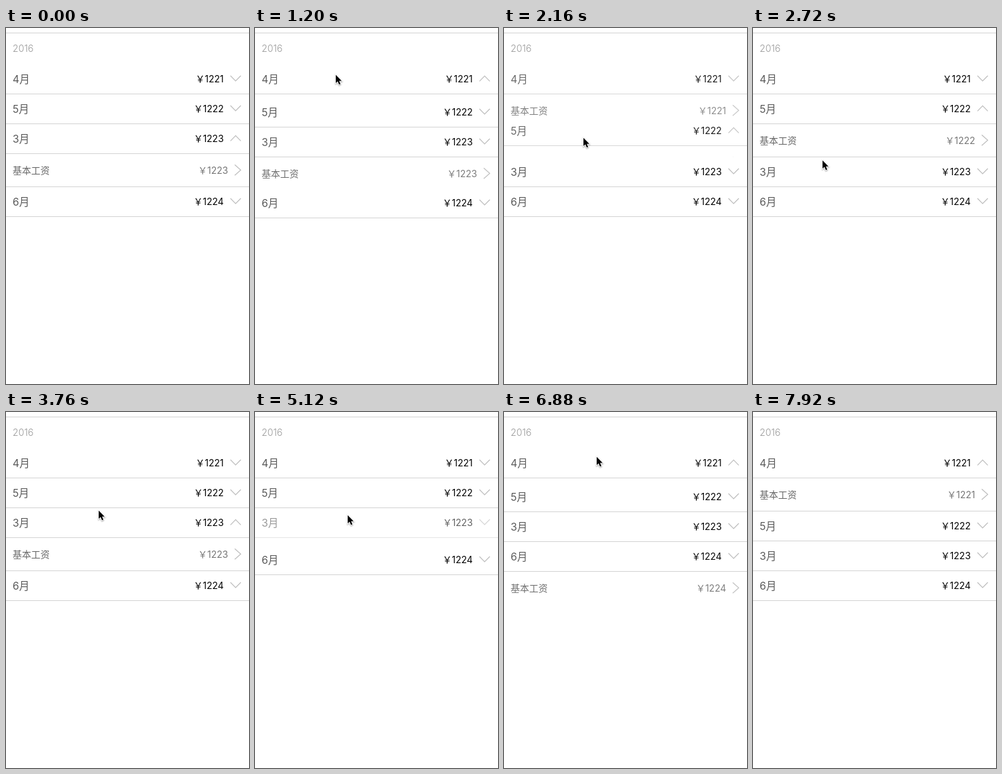
An HTML page with a canvas that plays this animation: 367x537 px, repeating every 8.64 s.

```html
<!DOCTYPE html>
<html lang="zh">
<head>
<meta charset="utf-8">
<title>工资</title>
<style>
  html, body { margin: 0; width: 100%; height: 100%; overflow: hidden; background: #fff; }
  canvas { display: block; width: 367px; height: 537px; }
</style>
</head>
<body>
<canvas id="stage"></canvas>
<script>
const W = 367, H = 537, LOOP = 8640, STEP = 80;
const ROW = 45, DETAIL = 50, TOP = 55, SPEED = 400, LAG = 20;
const FONT = 'Inter, "Noto Sans CJK SC", "Noto Sans CJK", sans-serif';
const rows = [4, 5, 3, 6].map((n, i) => ({ month: n + '月', amount: '￥' + (1221 + i) }));

// time and row of each tap; a tap on the open row closes it
const taps = [[1115, 0], [1995, 1], [2875, 2], [4850, 2], [5755, 3], [6786, 0]];

// cursor strokes: start, duration, end x, end y
const strokes = [
  [160, 80, 128, 162], [320, 480, 120, 70], [1350, 480, 118, 165], [2320, 400, 103, 199],
  [3440, 320, 138, 148], [3800, 200, 137, 190], [4400, 240, 138, 155], [5200, 400, 138, 205],
  [6160, 480, 138, 67], [7040, 400, 135, 518], [7600, 240, 112, 528]
];
const SHOWN = 160, GONE = 7920;

const canvas = document.getElementById('stage');
const ctx = canvas.getContext('2d');
const ratio = window.devicePixelRatio || 1;
canvas.width = Math.round(W * ratio);
canvas.height = Math.round(H * ratio);

const clamp = x => Math.max(0, Math.min(1, x));
const ease = x => x < 0.5 ? 2 * x * x : 1 - 2 * (1 - x) * (1 - x);
const smooth = x => x * x * (3 - 2 * x);

function text(str, x, y, size, color, align = 'left', weight = 400) {
  ctx.font = `${weight} ${size}px ${FONT}`;
  ctx.textAlign = align;
  ctx.fillStyle = color;
  ctx.fillText(str, x, y);
}

function rule(y) {
  ctx.fillStyle = '#d3d3d3';
  ctx.fillRect(0, y, W, 1);
}

function line(...pts) {
  ctx.beginPath();
  pts.forEach(([x, y]) => ctx.lineTo(x, y));
}

function chevron(...pts) {
  line(...pts);
  ctx.strokeStyle = '#bdbdbd';
  ctx.lineWidth = 1.2;
  ctx.stroke();
}

function drawDetail({ y, amount, shown, up }) {
  const top = y + ROW;
  ctx.globalAlpha = shown;
  text('基本工资', 10, top + 30, 14, '#666');
  text(amount, 335.5, top + 29.6, 14, '#777', 'right');
  chevron([345.5, top + 16.3], [354.5, top + 24.3], [345.5, top + 32.3]);
  if (up) rule(top + DETAIL - 1);
  ctx.globalAlpha = 1;
}

function drawHeader({ y, month, amount, up, alpha }) {
  ctx.fillStyle = '#fff';
  ctx.fillRect(0, y, W, ROW);
  ctx.globalAlpha = alpha;
  text(month, 10, y + 27.8, 15.7, '#5a5a5a');
  text(amount, 328.8, y + 27, 14, '#000', 'right');
  const [side, tip] = up ? [25.3, 17.3] : [17, 25];
  chevron([339, y + side], [346.8, y + tip], [354.6, y + side]);
  rule(y + ROW - 1);
  ctx.globalAlpha = 1;
}

function drawList(t) {
  let now = 2, before = 2, start = -SPEED;
  for (const [at, row] of taps) {
    if (at > t) break;
    before = now;
    now = row === now ? -1 : row;
    start = at;
  }
  const age = t - start;
  const x = clamp(age / SPEED);
  // a row closing below the opening one starts slightly later
  const lag = now >= 0 && now < before ? LAG : 0;
  const opening = ease(x);
  const closing = 1 - ease(clamp((age - lag) / SPEED));
  const dim = 1 - 0.46 * Math.sin(Math.PI * x ** 3);

  let y = TOP;
  const items = rows.map((row, i) => {
    const up = i === now, active = up || i === before;
    const open = up ? opening : active ? closing : 0;
    const shown = up ? x * x : active ? 1 - x * x : 0;
    const item = { ...row, up, shown, y: Math.ceil(y), alpha: active ? dim : 1 };
    y += ROW + DETAIL * open;
    return item;
  });
  items.filter(it => it.shown > 0).forEach(drawDetail);
  items.forEach(drawHeader);
}

function drawCursor(t) {
  if (t < SHOWN || t >= GONE) return;
  let x = 128, y = 333;
  for (const [start, span, endX, endY] of strokes) {
    const f = smooth(clamp((t - start) / span));
    x += (endX - x) * f;
    y += (endY - y) * f;
  }
  ctx.save();
  ctx.translate(x + 2, y + 0.7);
  line([0, 0], [0, 12.4], [2.9, 9.8], [5, 14.6], [7.1, 13.7], [5.1, 9], [8.9, 9]);
  ctx.closePath();
  ctx.shadowColor = 'rgba(0,0,0,.4)';
  ctx.shadowBlur = 2 * ratio;
  ctx.shadowOffsetY = ratio;
  ctx.strokeStyle = '#fff';
  ctx.lineWidth = 1.8;
  ctx.stroke();
  ctx.shadowColor = 'transparent';
  ctx.fillStyle = '#000';
  ctx.fill();
  ctx.restore();
}

function draw(t) {
  ctx.setTransform(ratio, 0, 0, ratio, 0, 0);
  ctx.fillStyle = '#fff';
  ctx.fillRect(0, 0, W, H);
  rule(7);
  text('2016', 10, 36.3, 14.2, '#999', 'left', 300);
  drawList(t);
  drawCursor(t);
}

const begin = performance.now();
function tick() {
  const t = (performance.now() - begin) % LOOP;
  draw(Math.floor(t / STEP) * STEP);
  requestAnimationFrame(tick);
}
tick();
</script>
</body>
</html>
```
